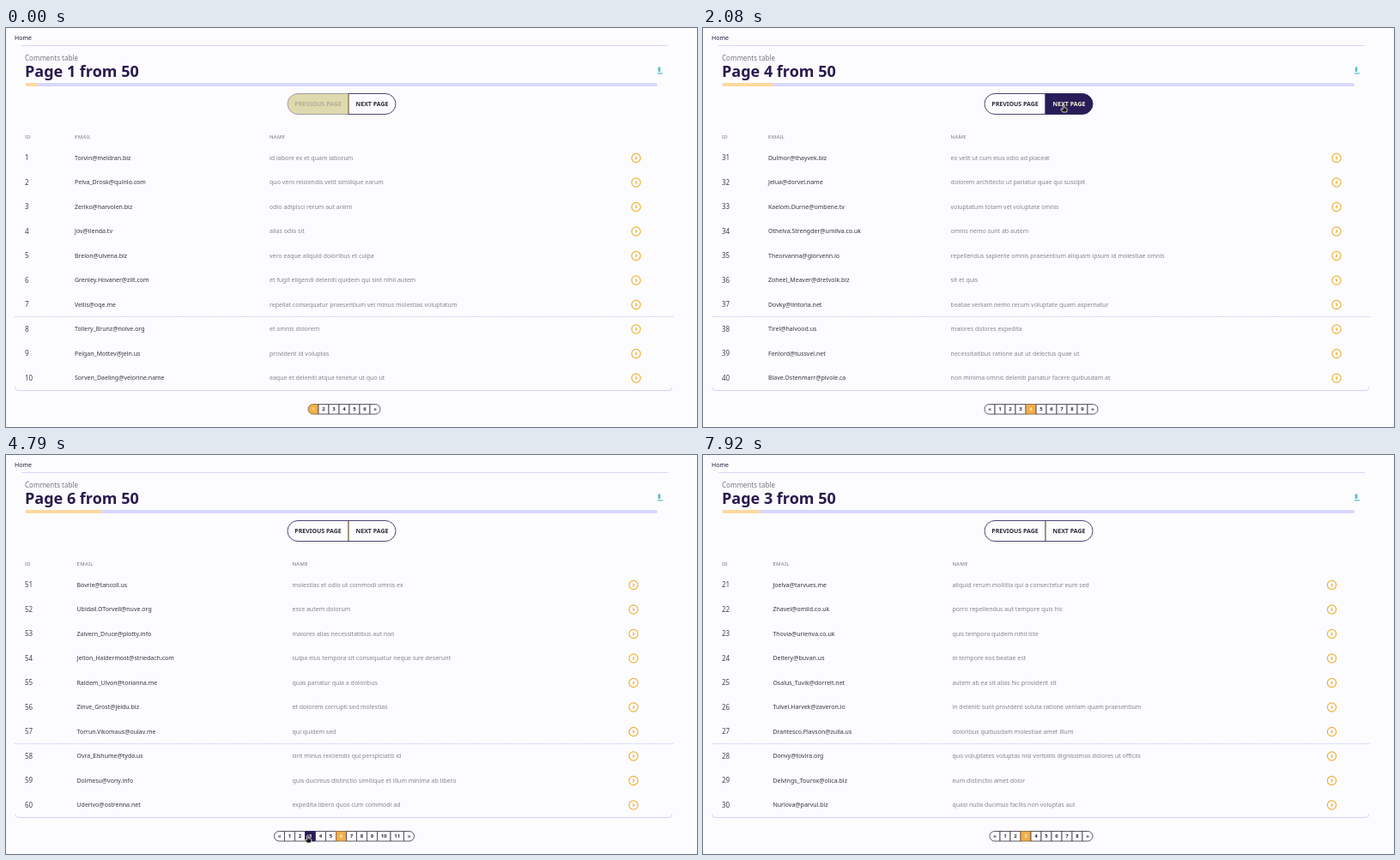
An HTML page for the animation above (8000 ms loop, 805 px wide and 465 px high).

```html
<!DOCTYPE html>
<html lang="en">
<head>
<meta charset="utf-8">
<title>Comments table</title>
<style>
html, body { margin: 0; width: 100%; height: 100%; overflow: hidden; background: #fcfcff; }
svg { display: block; width: 805px; height: 465px; font: 7px "Noto Sans", sans-serif; }
.home { fill: #1c1733; }
.sub { font-size: 8px; fill: #77757c; }
.title { font-size: 18px; font-weight: 700; fill: #291a4d; }
.head { font-size: 6px; letter-spacing: .3px; fill: #74727c; }
.id { font-size: 8px; fill: #44424a; }
.email { fill: #36333c; }
.name { fill: #84828c; }
.go { fill: none; stroke: #efb136; stroke-width: 1.2; }
.seg { fill: #fdfdff; stroke: #3b3266; stroke-width: .9; }
.label { font-weight: 700; fill: #2c2738; text-anchor: middle; }
.cell .seg { stroke: #4a4550; }
.cell .label { font-size: 6px; }
.hover .seg { fill: #281d58; stroke: #281d58; }
.hover .label { fill: #fbf3dc; }
.active .seg { fill: #f0ae48; stroke: #8a6a3c; }
.active .label { fill: #fdeecb; }
.off .seg { fill: #dfd9ae; stroke: #9c93a4; }
.off .label { fill: #b3ad98; }
</style>
</head>
<body>
<svg id="stage" viewBox="0 0 805 465"></svg>
<script>
const LOOP = 8000, TOTAL = 50;
const stage = document.getElementById('stage');

// page: [email x, name x, arrow x, rows as "email|name"]
const pages = {
  1: [80, 307, 734, `Torvin@meldran.biz|id labore ex et quam laborum
Pelva_Drosk@quinlo.com|quo vero reiciendis velit similique earum
Zeriko@harvolen.biz|odio adipisci rerum aut animi
Jov@ilenda.tv|alias odio sit
Brelon@ulvena.biz|vero eaque aliquid doloribus et culpa
Grenley.Hovaner@zilt.com|et fugit eligendi deleniti quidem qui sint nihil autem
Vellis@oqe.me|repellat consequatur praesentium vel minus molestias voluptatum
Tollery_Brunz@nolve.org|et omnis dolorem
Pelgan_Mottev@jeln.us|provident id voluptas
Sorven_Daeling@velorine.name|eaque et deleniti atque tenetur ut quo ut`],
  2: [80, 300, 735],
  3: [81.4, 290.4, 732.5, `Joelva@tarvues.me|aliquid rerum mollitia qui a consectetur eum sed
Zhavel@omild.co.uk|porro repellendus aut tempore quis hic
Thovia@urienva.co.uk|quis tempora quidem nihil iste
Deltery@buvan.us|in tempore eos beatae est
Osalus_Tuvik@dorrelt.net|autem ab ea sit alias hic provident sit
Tulvel.Harvek@zaveron.io|in deleniti sunt provident soluta ratione veniam quam praesentium
Drantesco.Plavson@zulla.us|doloribus quibusdam molestiae amet illum
Donvy@tovira.org|quo voluptates voluptas nisi veritatis dignissimos dolores ut officiis
Delvings_Tourox@olica.biz|eum distinctio amet dolor
Nurlova@parvul.biz|quasi nulla ducimus facilis non voluptas aut`],
  4: [76, 288.6, 738, `Dulmor@thayvek.biz|ex velit ut cum eius odio ad placeat
Jelua@dorvel.name|dolorem architecto ut pariatur quae qui suscipit
Kaelom.Durne@ombene.tv|voluptatum totam vel voluptate omnis
Othelva.Strengder@umilva.co.uk|omnis nemo sunt ab autem
Theorvanna@glorvenn.io|repellendus sapiente omnis praesentium aliquam ipsum id molestiae omnis
Zoheel_Meaver@dretvolk.biz|sit et quis
Dovky@lintoria.net|beatae veniam nemo rerum voluptate quam aspernatur
Tirel@halvood.us|maiores dolores expedita
Fenlord@tussvel.net|necessitatibus ratione aut ut delectus quae ut
Blave.Ostenmarr@pivole.ca|non minima omnis deleniti pariatur facere quibusdam at`],
  5: [80, 310, 733],
  6: [82.5, 333.5, 731, `Bovrie@tancoll.us|molestias et odio ut commodi omnis ex
Ubidail.OTorvell@nuve.org|esse autem dolorum
Zalvern_Druce@plotty.info|maiores alias necessitatibus aut non
Jelton_Haldermost@striedach.com|culpa eius tempora sit consequatur neque iure deserunt
Raldem_Ulvon@torianna.me|quas pariatur quia a doloribus
Zinve_Grost@jeidu.biz|et dolorem corrupti sed molestias
Torrun.Vikomaus@oulav.me|qui quidem sed
Ovra_Elshume@tyda.us|sint minus reiciendis qui perspiciatis id
Dolmesu@vony.info|quis ducimus distinctio similique et illum minima ab libero
Uderivo@ostrenna.net|expedita libero quos cum commodi ad`],
  7: [84, 320, 733],
  8: [86.6, 331.6, 726.5, `Zovinea@delaquine.me|vel pariatur perferendis vero ab aut voluptates labore
Tolbira.Nurks@movalah.name|quia sunt dolor dolor suscipit expedita quis
Velmond_Plavam@jorlee.biz|ut quia ipsa repellat sunt et sequi aut est
Tuvvie_Dulne@pharol.biz|ut non illum pariatur dolor
Novhard@thelvic.co.uk|minus laboriosam consequuntur
Zabe_Morlen@dulle.name|porro ut soluta repellendus similique
Ulfrem@nodyl.biz|dolores et quo omnis voluptates
Lothavine@merdyx.com|voluptas voluptas voluptatibus blanditiis
Orther_Vulke@threna.biz|beatae ut ad quisquam sed repellendus et
Ovandelune@blav.net|et cumque ad culpa ut eligendi non`]
};

// [time, page shown from then on]
const pageSteps = [[0, 1], [1180, 2], [1620, 3], [2000, 4], [2240, 5], [2400, 6], [2560, 7],
  [2700, 8], [3220, 7], [3500, 6], [5010, 3]];
// [time, x, y] of the pointer tip
const path = [[160, 640, 250], [760, 489, 85], [880, 489, 85], [1080, 420, 89], [2900, 420, 89],
  [3080, 365, 90], [3680, 365, 90], [4220, 342, 454], [4480, 351.5, 443], [5060, 351.5, 443],
  [5270, 380, 390], [5800, 560, 250]];

function el(tag, attrs, parent = stage, content) {
  const node = document.createElementNS('http://www.w3.org/2000/svg', tag);
  for (const key in attrs) node.setAttribute(key, attrs[key]);
  if (content !== undefined) node.textContent = content;
  return parent.appendChild(node);
}
const text = (cls, x, y, content, parent) => el('text', { class: cls, x, y }, parent, content);
const line = (d, stroke, more) => el('path', { d, stroke, fill: 'none', ...more });

// Box with separate corner radii on the left and right side.
function segment(x, y, w, h, l, r) {
  return `M${x + l} ${y}h${w - l - r}a${r} ${r} 0 0 1 ${r} ${r}v${h - 2 * r}a${r} ${r} 0 0 1 ${-r} ${r}` +
    `h${l + r - w}a${l} ${l} 0 0 1 ${-l} ${-l}v${2 * l - h}a${l} ${l} 0 0 1 ${l} ${-l}z`;
}

function button(cls, box, label, baseline, parent) {
  const g = el('g', { class: cls }, parent);
  const [x, y, w, h] = box;
  el('path', { class: 'seg', d: segment(...box) }, g);
  text('label', x + w / 2, baseline, label, g);
  return { g, cls, hit: (px, py) => px >= x && px < x + w && py >= y && py < y + h };
}

let seed = 7;
const pick = list => list[(seed = (seed * 16807) % 2147483647) % list.length];
const words = 'et ut quia dolor omnis voluptas nihil sit aut quidem rerum molestiae eos tempora vel'.split(' ');
const starts = 'Tor Vel Dra Zul Bren Hol Jev'.split(' ');
const ends = 'vina dalo mirel kesh ronva lume'.split(' ');

function inventRow() {
  const user = pick(starts) + pick(ends);
  const host = pick(starts).toLowerCase() + pick(ends);
  const count = 3 + pick([0, 1, 2, 3, 4]);
  return `${user}@${host}.${pick(['biz', 'com', 'net', 'us'])}|` +
    Array.from({ length: count }, () => pick(words)).join(' ');
}

function buildPager(page, parent) {
  const labels = page > 1 ? ['«'] : [];
  for (let n = Math.max(1, page - 5); n <= page + 5; n++) labels.push(n);
  labels.push('»');
  const widths = labels.map(n => n > 9 ? 15.5 : 12);
  let x = 394 - widths.reduce((a, b) => a + b) / 2;
  return labels.map((label, i) => {
    const last = i === labels.length - 1;
    const box = [x, 438.5, widths[i], 11.5, i ? 0 : 5.7, last ? 5.7 : 0];
    x += widths[i];
    return button(label === page ? 'cell active' : 'cell', box, label, 446.4, parent);
  });
}

function buildPage(page) {
  const [emailX, nameX, goX, source] = pages[page];
  const rows = source ? source.split('\n') : Array.from({ length: 10 }, inventRow);
  const g = el('g', { display: 'none' });
  text('title', 22, 57, `Page ${page} from ${TOTAL}`, g);
  el('path', { d: segment(22.5, 64, 736 * page / TOTAL, 4, 2, 0), fill: '#ffd9a0' }, g);
  text('head', 22, 129, 'ID', g);
  text('head', emailX, 129, 'EMAIL', g);
  text('head', nameX, 129, 'NAME', g);
  rows.forEach((row, i) => {
    const mid = 151.5 + 28.5 * i, base = Math.round(mid + 2.2);
    const [email, name] = row.split('|');
    text('id', 22, Math.round(mid + 2.8), page * 10 - 9 + i, g);
    text('email', emailX, base, email, g);
    text('name', nameX, base, name, g);
    el('circle', { class: 'go', cx: goX, cy: mid, r: 5.1 }, g);
    el('path', { class: 'go', d: `M${goX - .8} ${mid - 1.7}l1.7 1.7l-1.7 1.7` }, g);
  });
  return { g, cells: buildPager(page, g) };
}

text('home', 10, 13.5, 'Home');
line('M18 20.5H771', '#e0d3fa');
text('sub', 22, 37.5, 'Comments table');
el('rect', { x: 22.5, y: 64, width: 736.5, height: 4, rx: 2, fill: '#d8d7ff' });
line('M761 45.5V51', '#56bccb', { 'stroke-width': 2.6 });
line('M759 52.8H765', '#7bcdd6', { 'stroke-width': 1.6 });
line('M10.5 336.5H777', '#d0c8f6', { 'stroke-dasharray': '1.5 1' });
line('M10.5 418.5q0 4 4 4H772q4 0 4-4', '#d6cffb');

const prev = button('btn', [328, 76.5, 71, 24, 12, 0], 'PREVIOUS PAGE', 91);
const next = button('btn', [399, 76.5, 55, 24, 0, 12], 'NEXT PAGE', 91);
const divider = line('M399 77V100', '#b5a656');

const views = {};
for (const n in pages) views[n] = buildPage(+n);

const pointer = el('g', {});
const skin = { fill: '#15121c', stroke: '#fbf3dc', 'stroke-width': .8, 'stroke-linejoin': 'round' };
const arrow = el('path', { ...skin, d: 'M0 0V8.6L2 6.9L3.3 9.8L4.8 9.1L3.5 6.3H6z' }, pointer);
const hand = el('path', { ...skin,
  d: 'M-.8 .6q.8-1 1.6 0V3.8L3.6 4.4q.8.3.7 1.2L3.7 9H-1L-3 6.2q-.5-1 .5-1.1L-.8 6z' }, pointer);

function pointerAt(t) {
  const i = path.findIndex(p => p[0] > t);
  if (i < 1) return null;
  const [t0, x0, y0] = path[i - 1], [t1, x1, y1] = path[i];
  const u = (t - t0) / (t1 - t0), k = u * u * (3 - 2 * u);
  return [x0 + (x1 - x0) * k, y0 + (y1 - y0) * k];
}

function draw(t) {
  const page = pageSteps.filter(s => s[0] <= t).pop()[1];
  const pos = pointerAt(t);
  for (const n in views) views[n].g.setAttribute('display', +n === page ? 'inline' : 'none');

  let over = null;
  for (const b of [prev, next, ...views[page].cells]) {
    const off = b === prev && page === 1;
    const hover = !off && !b.cls.includes('active') && pos && b.hit(...pos);
    if (hover) over = b;
    b.g.setAttribute('class', b.cls + (off ? ' off' : hover ? ' hover' : ''));
  }
  divider.setAttribute('display', over === prev || over === next ? 'none' : 'inline');

  pointer.setAttribute('display', pos ? 'inline' : 'none');
  if (!pos) return;
  pointer.setAttribute('transform', `translate(${pos[0]} ${pos[1]})`);
  arrow.setAttribute('display', over ? 'none' : 'inline');
  hand.setAttribute('display', over ? 'inline' : 'none');
}

const begin = performance.now();
function tick() {
  draw((performance.now() - begin) % LOOP);
  requestAnimationFrame(tick);
}
tick();
</script>
</body>
</html>
```
